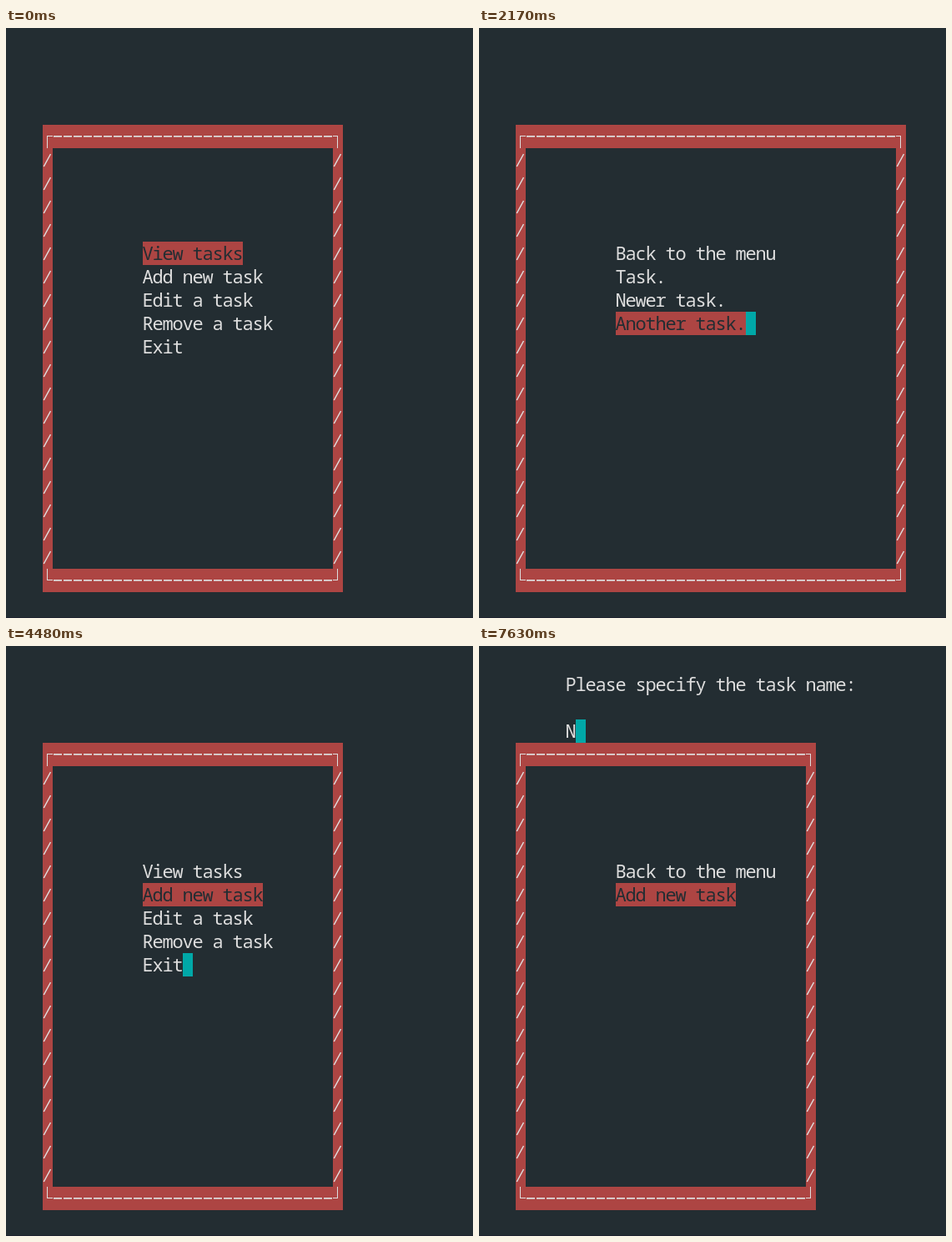
Write an HTML page with a canvas that moves like this. It is 560 px wide and 707 px high and loops after 8000 ms.

```html
<!DOCTYPE html>
<html lang="en">
<head>
<meta charset="utf-8">
<title>Task list in a terminal</title>
<style>
  html, body { margin: 0; width: 100%; height: 100%; overflow: hidden; background: #232d32; }
  canvas { display: block; }
</style>
</head>
<body>
<canvas id="stage" width="560" height="707"></canvas>
<script>
const ctx = document.getElementById('stage').getContext('2d');
const LOOP = 8000, CELL_W = 12, CELL_H = 28;
const BG = '#232d32', RED = '#ad4543', TEXT = '#dedede', TEAL = '#00a8a8';

const screens = {
  menu: { cols: 30, items: ['View tasks', 'Add new task', 'Edit a task', 'Remove a task', 'Exit'] },
  view: { cols: 39, items: ['Back to the menu', 'Task.', 'Newer task.', 'Another task.'] },
  add:  { cols: 30, items: ['Back to the menu', 'Add new task'] }
};

// Each step: start time, screen (null = cleared), selected item, cursor shown, typed text
const steps = [
  [0, 'menu', 0, false],
  [300, 'menu', 0, true],
  [700, null],
  [740, 'view', 0, true],
  [1200, 'view', 0, false],
  [1580, 'view', 1, true],
  [1930, 'view', 2, true],
  [2170, 'view', 3, true],
  [2830, 'view', 2, true],
  [3070, 'view', 1, true],
  [3380, 'view', 0, true],
  [3740, null],
  [3780, 'menu', 0, true],
  [4240, 'menu', 0, false],
  [4440, null],
  [4480, 'menu', 1, true],
  [4920, null],
  [4960, 'add', 0, true],
  [5420, 'add', 0, false],
  [5910, 'add', 1, true],
  [6410, 'add', 1, false],
  [6470, 'add', 1, true, ''],
  [6970, 'add', 1, false, ''],
  [7460, 'add', 1, true, ''],
  [7630, 'add', 1, true, 'N']
];

function rect(x, y, w, h, color) {
  ctx.fillStyle = color;
  ctx.fillRect(x, y, w, h);
}

function write(text, x, y, color = TEXT) {
  ctx.fillStyle = color;
  ctx.fillText(text, x - 0.6, y + 22);
}

function drawBorder(cols) {
  const left = 44, top = 116, bottom = 648, right = left + (cols - 1) * CELL_W;
  const width = cols * CELL_W;
  rect(left, top, width, CELL_H, RED);
  rect(left, bottom, width, CELL_H, RED);
  for (const x of [left, right]) {
    rect(x, top, CELL_W, bottom + CELL_H - top, RED);
    ctx.beginPath();
    for (let y = top + CELL_H; y < bottom; y += CELL_H) {
      ctx.moveTo(x + 1.3, y + 22);
      ctx.lineTo(x + 9.5, y + 7);
    }
    ctx.strokeStyle = TEXT;
    ctx.lineWidth = 1.5;
    ctx.stroke();
    const start = x === left ? x + 5 : x;
    rect(start, top + 13, x === left ? 7 : 6, 1, TEXT);
    rect(start, bottom + 13, x === left ? 7 : 6, 1, TEXT);
    rect(x + 5, top + 13, 1, 15, TEXT);
    rect(x + 5, bottom, 1, 14, TEXT);
  }
  for (let x = left + CELL_W; x < right; x += CELL_W) {
    rect(x + 1, top + 13, 10, 1.7, TEXT);
    rect(x + 1, bottom + 13, 10, 1.7, TEXT);
  }
}

function draw(time) {
  const [, name, selected, cursor, typed] = steps.findLast(step => step[0] <= time);
  rect(0, 0, 560, 707, BG);
  rect(0, 706, 560, 1, '#1e2230');
  if (!name) return;

  const { cols, items } = screens[name];
  drawBorder(cols);
  items.forEach((item, i) => {
    const y = 256 + i * CELL_H;
    if (i === selected) rect(164, y, item.length * CELL_W, CELL_H, RED);
    write(item, 164, y, i === selected ? BG : TEXT);
  });

  let cursorX = 164 + items.at(-1).length * CELL_W;
  let cursorY = 256 + (items.length - 1) * CELL_H;
  if (typed !== undefined) {
    write('Please specify the task name:', 104, 32);
    write(typed, 104, 88);
    cursorX = 104 + typed.length * CELL_W;
    cursorY = 88;
  }
  if (cursor) rect(cursorX, cursorY, CELL_W, CELL_H, TEAL);
}

ctx.font = '300 22px "Noto Sans Mono", monospace';
ctx.letterSpacing = '-1.2px';

const origin = performance.now();
function tick() {
  draw((performance.now() - origin) % LOOP);
  requestAnimationFrame(tick);
}
tick();
</script>
</body>
</html>
```
